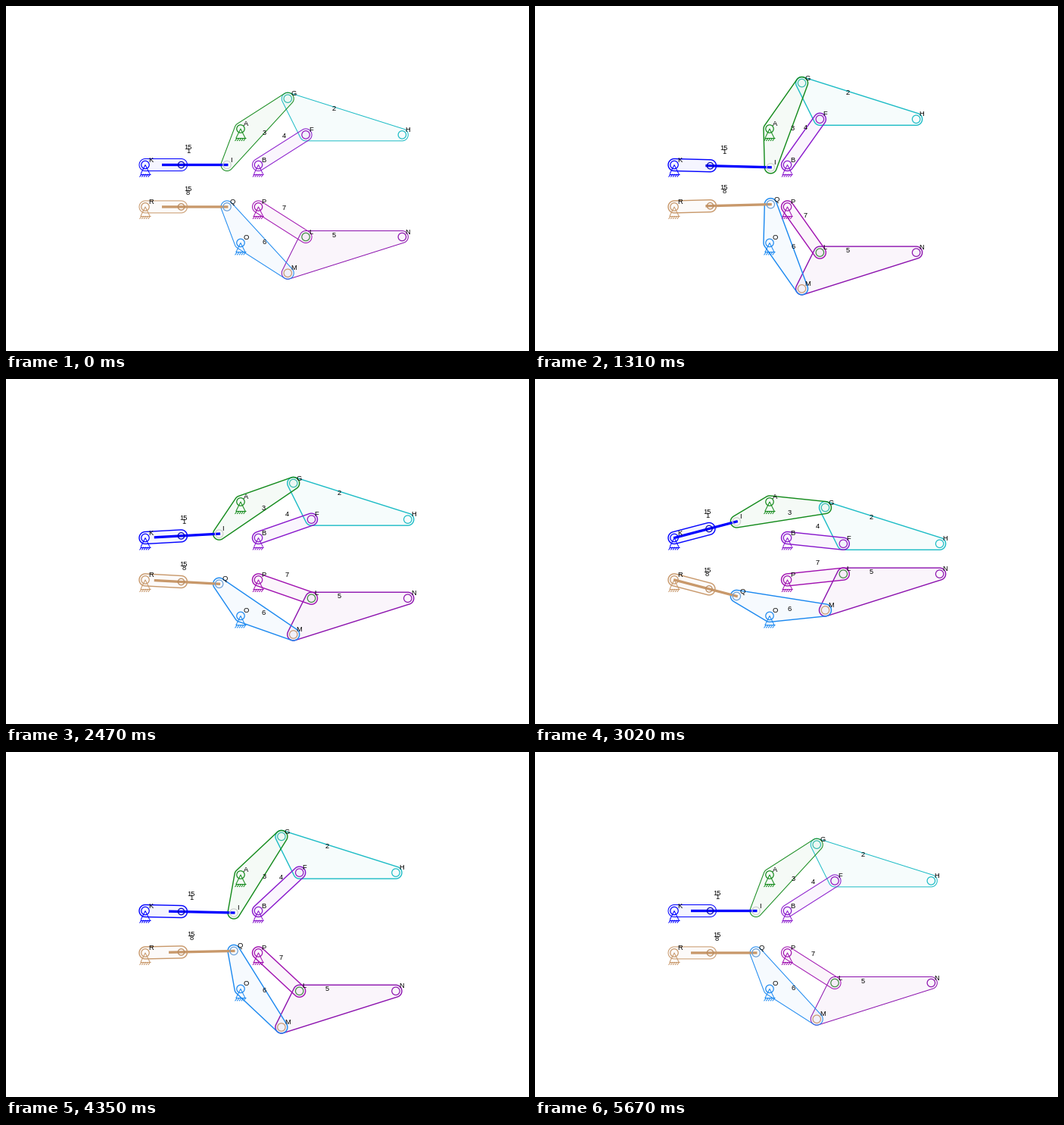
Write a matplotlib script that moves like this. It is 691 by 455 pixels and loops after 5.75 s.

```python
import math

import numpy as np
import matplotlib.pyplot as plt
from matplotlib.animation import FuncAnimation

W, H, DPI = 691, 455, 128
PX = 72 / DPI                      # one pixel in points
LOOP, TICK = 5750, 25
RADIUS = 8                         # half width of a link
MIRROR = 474.4                     # the lower half is y -> MIRROR - y
LAST = 72                          # the last step returns to rest

# Upper half: fixed pivots and link sizes
K = np.array([184.0, 209.5])
A = np.array([310.0, 162.0])
B = np.array([333.5, 209.5])
CRANK, ARM = 73.9, 50.8            # lengths A-G and A-I
BARREL, ROD = 47.5, 86
ARM_ANGLE = math.radians(216.65)   # from A-G round to A-I

# When the clock shows which step
CLOCK = [170, 770, 1390, 2010, 2620, 3260, 3890, 4500, 4870, 5130, 5670]
STEPS = [1, 9, 17, 25, 33, 41, 49, 57, 62, 65, LAST]

# Turning points of the cylinder and its length there
TURNS = [1, 13.7, 37.7, 62.9, 71]
LENGTHS = [108, 131.9, 84.55, 131.9, 116]

BLUE, TAN, GREEN, AZURE = "#0000ff", "#c8986a", "#128a1a", "#1a88f0"
TEAL, VIOLET, PLUM, PURPLE = "#1cbcc6", "#8816cc", "#a010b0", "#8c12ae"

fig = plt.figure(figsize=(W / DPI, H / DPI), dpi=DPI, facecolor="white")
ax = fig.add_axes([0, 0, 1, 1])
ax.set_xlim(0, W)
ax.set_ylim(H, 0)
ax.axis("off")


def flip(p):
    return np.array([p[0], MIRROR - p[1]])


def step_at(ms):
    if ms < CLOCK[0]:
        return 0
    return int(np.interp(ms, CLOCK, STEPS) + 1e-6)


def stroke_length(step):
    """Distance K-I: runs out and back at constant speed."""
    return LENGTHS[0] if step == LAST else np.interp(step, TURNS, LENGTHS)


def solve(step):
    """All joints, upper and mirrored lower, at one step."""
    d = stroke_length(step)
    base = A - K
    span = math.hypot(*base)
    bend = math.acos((span ** 2 + ARM ** 2 - d ** 2) / (2 * span * ARM))
    arm = math.pi + math.atan2(-base[1], base[0]) + bend
    crank = arm - ARM_ANGLE
    i = A + ARM * np.array([math.cos(arm), -math.sin(arm)])
    g = A + CRANK * np.array([math.cos(crank), -math.sin(crank)])
    f = g + (23.8, 47.7)
    h = f + (127.3, 0)
    along = (i - K) / d
    up = dict(K=K, A=A, B=B, I=i, G=g, F=f, H=h,
              slide=K + BARREL * along, tip=i + 1.5 * along,
              tail=i - ROD * along)
    low = dict(K="R", A="O", B="P", I="Q", G="M", F="L", H="N")
    joints = dict(up)
    for name, p in up.items():
        joints[low.get(name, name + "2")] = flip(p)
    return joints


def outline(pts):
    """Convex polygon grown by RADIUS with round corners."""
    pts = np.array(pts)
    nxt = np.roll(pts, -1, axis=0)
    if np.sum(pts[:, 0] * nxt[:, 1] - nxt[:, 0] * pts[:, 1]) < 0:
        pts = pts[::-1]
        nxt = np.roll(pts, -1, axis=0)
    edge = nxt - pts
    normal = np.arctan2(-edge[:, 0], edge[:, 1])
    path = []
    for n, p in enumerate(pts):
        turn = (normal[n] - normal[n - 1]) % (2 * math.pi)
        a = normal[n - 1] + np.linspace(0, turn, 20)
        path.append(p + RADIUS * np.column_stack([np.cos(a), np.sin(a)]))
    return np.vstack(path)


def line(xs, ys, color, width=1.0, z=3):
    return ax.plot(xs, ys, color=color, lw=width * PX, zorder=z,
                   solid_capstyle="butt")[0]


def ground(p, color):
    x, y = p
    foot = y + 12
    line([x - 6, x, x + 6], [foot, y, foot], color)
    line([x - 7, x + 7], [foot, foot], color)
    for n in range(5):
        top = x - 4.5 + 2.8 * n
        line([top, top - 3], [foot, foot + 4], color)


def write(s, ha="left"):
    return ax.text(0, 0, s, family="Liberation Sans", fontsize=9.4 * PX,
                   color="black", ha=ha, va="baseline", zorder=6)


start = solve(0)

# joints of the link, colour, number, shift of the number from the mean
LINKS = [
    (("K", "slide"), BLUE, None, None),
    (("R", "slide2"), TAN, None, None),
    (("G", "H", "F"), TEAL, "2", (2.7, -19.2)),
    (("M", "N", "L"), PURPLE, "5", (2.7, -19.2)),
    (("A", "G", "I"), GREEN, "3", (16.2, 2.3)),
    (("O", "M", "Q"), AZURE, "6", (16.3, 1.3)),
    (("B", "F"), VIOLET, "4", (2.7, -19.2)),
    (("P", "L"), PLUM, "7", (2.7, -19.2)),
]
TAGS = [(names, num, off) for names, _, num, off in LINKS if num] + [
    (("K", "I"), "1", (2.7, -19.2)),
    (("K", "I"), "15", (2.2, -24.2)),
    (("R", "Q"), "8", (2.7, -19.2)),
    (("R", "Q"), "15", (2.2, -24.2)),
]
RINGS = dict(K=BLUE, R=TAN, A=GREEN, O=AZURE, B=VIOLET, P=PLUM,
             G="#34bcae", M="#c89870", F="#9414c0", L="#3f8a3f",
             H=TEAL, N=PURPLE, I="#cfd2cf", Q="#6a9fd8",
             slide="#0000b4", slide2="#b98a5e")

shapes = []
for z, (names, color, _, _) in enumerate(LINKS):
    path = outline([start[n] for n in names])
    fill = ax.fill(path[:, 0], path[:, 1], color=color, alpha=0.04, lw=0,
                   zorder=1)[0]
    shapes.append((names, fill, line([], [], color, z=2 + z / 10)))

rods = [("tail", "tip", line([], [], BLUE, 3.3, 3)),
        ("tail2", "tip2", line([], [], TAN, 3.3, 3))]

for name in "KRAOBP":
    ground(start[name], RINGS[name])

rings = {}
for name, color in RINGS.items():
    size = 4.2 if name.startswith("slide") else 5.2
    rings[name] = ax.add_patch(plt.Circle(start[name], size, fill=False,
                                          ec=color, lw=1.2 * PX, zorder=4))

letters = {name: write(name) for name in RINGS if len(name) == 1}
numbers = [(names, off, write(num, "center")) for names, num, off in TAGS]


def update(frame):
    step = step_at(frame * TICK + 20)
    joints = solve(step)
    width = 1.0 if step in (0, LAST) else 1.4
    for names, fill, edge in shapes:
        path = outline([joints[n] for n in names])
        fill.set_xy(path)
        edge.set_data(*np.vstack([path, path[:1]]).T)
        edge.set_linewidth(width * PX)
    for a, b, rod in rods:
        rod.set_data(*np.array([joints[a], joints[b]]).T)
    for name, ring in rings.items():
        ring.center = tuple(joints[name])
    for name, text in letters.items():
        text.set_position(joints[name] + (4, -3.9))
    for names, off, text in numbers:
        middle = np.mean([joints[n] for n in names], axis=0)
        text.set_position(middle + off + (-0.2, 3.3))
    return []


anim = FuncAnimation(fig, update, frames=LOOP // TICK, interval=TICK,
                     init_func=lambda: update(0), repeat=True,
                     repeat_delay=0, blit=False)
plt.show()
```
